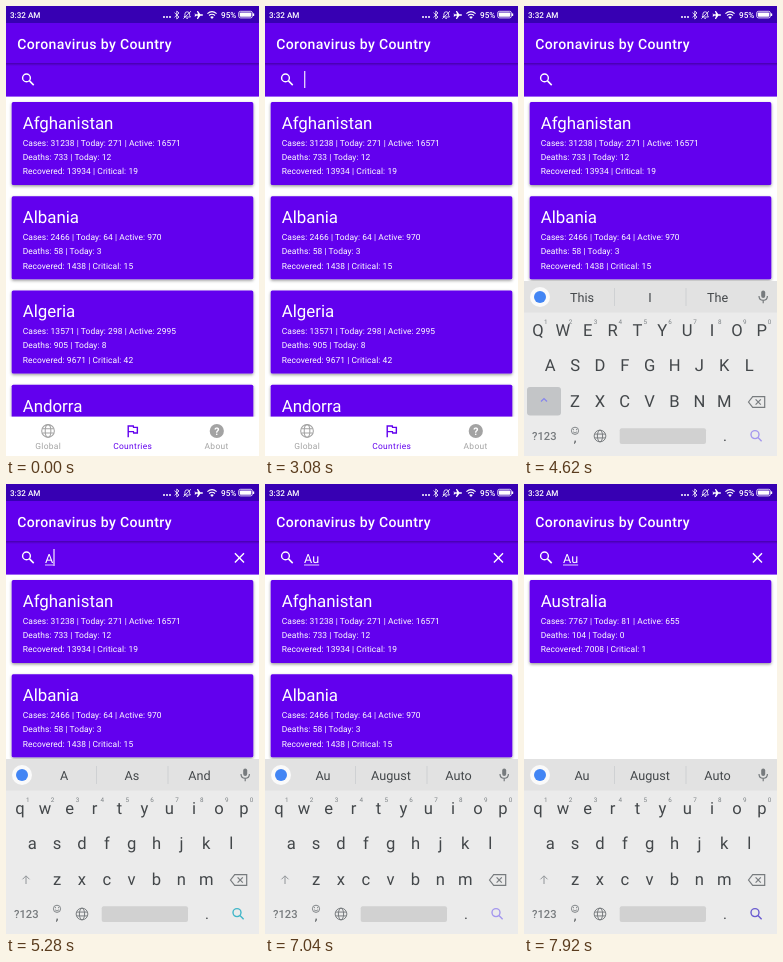
Write an HTML page that moves like this. It is 253x450 px and loops after 8 s.

```html
<!DOCTYPE html>
<html lang="en">
<head>
<meta charset="utf-8">
<title>Country search</title>
<style>
html, body { margin: 0; width: 100%; height: 100%; overflow: hidden; background: #fff; }
svg { display: block; width: 100vw; height: 100vh; }
text { font-family: Roboto, sans-serif; white-space: pre; text-rendering: geometricPrecision; }
.mid { text-anchor: middle; }
.line { fill: none; stroke: currentColor; }
</style>
</head>
<body>
<svg id="stage" viewBox="0 0 253 450">
  <defs>
    <filter id="shadow" x="-5%" y="-10%" width="110%" height="125%">
      <feDropShadow dx="0" dy="1.3" stdDeviation="1.5" flood-opacity=".42"/>
    </filter>
    <linearGradient id="fade" x2="0" y2="1">
      <stop stop-opacity=".28"/><stop offset="1" stop-opacity="0"/>
    </linearGradient>
    <g id="lens">
      <circle class="line" cx="9.5" cy="9.5" r="5.5" stroke-width="2"/>
      <path class="line" d="M13.8 13.8L19.8 19.8" stroke-width="2.2"/>
    </g>
    <g id="globe" class="line" stroke-width="1.5">
      <circle cx="12" cy="12" r="9"/><ellipse cx="12" cy="12" rx="4" ry="9"/>
      <path d="M4 9H20M4 15H20"/>
    </g>
  </defs>

  <rect width="253" height="450" fill="#fff"/>
  <g id="cards"></g>

  <!-- Bars -->
  <rect y="17" width="253" height="73.6" fill="#6200ee"/>
  <rect y="57" width="253" height="3" fill="url(#fade)"/>
  <rect width="253" height="17" fill="#3700b3"/>
  <g fill="#fff" color="#fff">
    <text x="4" y="12" font-size="8.1" font-weight="500">3:32 AM</text>
    <circle cx="158" cy="11" r="1"/><circle cx="161" cy="11" r="1"/><circle cx="164" cy="11" r="1"/>
    <path class="line" d="M168.5 6.7L173 11 170.8 13V5L173 7 168.5 11.3" stroke-width=".8"/>
    <path class="line" d="M178 11H184.5L183.6 9.8V8Q183.4 5.8 181.2 5.8T178.9 8V9.8ZM180.3 12.4H182M185 5.2L177.4 12.6" stroke-width=".8"/>
    <path d="M189 8.3H192L190.9 5H192L194.3 8.3H196.5Q197.6 9 196.5 9.7H194.3L192 13H190.9L192 9.7H190.2L189.4 10.6H188.6L189 9 188.6 7.4H189.4Z"/>
    <path class="line" d="M201.4 7.6Q206 3.6 210.6 7.6M203 9.5Q206 7 209 9.5" stroke-width="1.1"/>
    <path d="M204.2 10.9Q206 9.6 207.8 10.9L206 13Z"/>
    <text x="215" y="12" font-size="8.2" font-weight="500">95%</text>
    <rect class="line" x="232.7" y="5.3" width="13.7" height="6.6" rx="1.8" stroke-width=".8"/>
    <rect x="233.8" y="6.4" width="11.5" height="4.4" rx=".8"/>
    <rect x="247" y="7.2" width="1.2" height="2.8" rx=".5"/>
    <text x="11.2" y="43" font-size="14.06" font-weight="500" letter-spacing=".36">Coronavirus by Country</text>
    <use href="#lens" transform="translate(13.8 65.2) scale(.703)"/>
    <text id="query" x="39" y="79" font-size="12.65"></text>
    <rect id="underline" x="39" y="80.6" height=".8"/>
    <rect id="cursor" y="65" width="1.1" height="17"/>
    <path id="clear" class="line" d="M228.9 69.3L238 78.4M238 69.3L228.9 78.4" stroke-width="1.4"/>
  </g>

  <!-- Bottom navigation -->
  <rect y="410.6" width="253" height="39.4" fill="#fff"/>
  <g class="mid" font-size="8.43" letter-spacing=".33" fill="#a3a3a3" color="#a3a3a3">
    <use href="#globe" transform="translate(33.6 416.5) scale(.703)"/>
    <text x="42.2" y="443">Global</text>
    <g fill="#6200ee" color="#6200ee">
      <path class="line" d="M6 21V5H13.2L13.6 7H19V15H13.8L13.4 13H6" stroke-width="2" transform="translate(118 416.5) scale(.703)"/>
      <text x="126.7" y="443">Countries</text>
    </g>
    <circle cx="210.8" cy="425" r="7.1"/>
    <text x="210.8" y="428.8" font-size="10.5" font-weight="700" letter-spacing="0" style="fill:#fff">?</text>
    <text x="210.6" y="443">About</text>
  </g>

  <!-- Keyboard -->
  <g id="keyboard" fill="#43474a" color="#777b7e">
    <rect y="275" width="253" height="175" fill="#ebebeb"/>
    <rect y="275" width="253" height="31.5" fill="#e2e2e2"/>
    <circle cx="16" cy="291" r="10" fill="#fafafa"/>
    <circle cx="16" cy="291" r="6" fill="#4285f4"/>
    <path class="line" d="M90.5 282V300M162 282V300" stroke-width=".8" style="stroke:#cbcdd0"/>
    <g id="hints" class="mid" font-size="12.65"></g>
    <rect x="237.2" y="284.5" width="4" height="7.6" rx="2" fill="#777b7e"/>
    <path class="line" d="M235 290Q235 294.3 239.2 294.3T243.4 290M239.2 294.3V297.3" stroke-width="1.2"/>
    <rect id="shiftKey" x="3" y="381" width="34" height="28.5" rx="3" fill="#c3c5c7"/>
    <path id="shiftOff" class="line" d="M16.5 395.3L20 391.8 23.5 395.3M20 392V400" stroke-width="1" style="stroke:#909498"/>
    <path id="shiftOn" class="line" d="M17 395.5L20 392.5 23 395.5" stroke-width="1.2" style="stroke:#8685ee"/>
    <g id="keys" class="mid" font-size="16.6"></g>
    <path class="line" d="M224.5 396L228.7 390.7H240.7V401.3H228.7ZM231.6 393.4L236.8 398.6M236.8 393.4L231.6 398.6" stroke-width="1.2"/>
    <text x="8" y="434" font-size="11.2" font-weight="500" fill="#777b7e">?123</text>
    <circle class="line" cx="51" cy="424.8" r="3.6" stroke-width=".9"/>
    <path class="line" d="M49 425.8Q51 428 53 425.8M49.5 423V424.2M52.5 423V424.2" stroke-width=".8"/>
    <text class="mid" x="51" y="436" font-size="13">,</text>
    <use href="#globe" transform="translate(68.2 422.2) scale(.65)"/>
    <rect x="95.7" y="422.3" width="86.3" height="15.7" rx="2" fill="#d1d1d1"/>
    <text class="mid" x="201" y="434.5" font-size="15">.</text>
    <g id="go" class="line" stroke-width="1.4">
      <circle cx="231" cy="428.6" r="4"/><path d="M234 431.6L237.6 435.2"/>
    </g>
  </g>
</svg>
<script>
const $ = id => document.getElementById(id);
const LOOP = 8000, TICK = 220;

const label = (x, y, s, extra = "") => `<text x="${x}" y="${y}" ${extra}>${s}</text>`;

function card([name, cases, today, active, deaths, died, recovered, critical], i) {
  const y = 96.1 + 94.2 * i;
  const lines = [
    `Cases: ${cases} | Today: ${today} | Active: ${active}`,
    `Deaths: ${deaths} | Today: ${died}`,
    `Recovered: ${recovered} | Critical: ${critical}`
  ];
  return `<rect x="5.7" y="${y}" width="241.6" height="83" rx="1.6" fill="#6200ee" filter="url(#shadow)"/>
    <g fill="#fff" font-size="8.43" letter-spacing=".07">
    ${label(16.7, y + 26.9, name, 'font-size="16.87" letter-spacing="0"')}
    ${lines.map((s, n) => label(16.7, y + 43.5 + 14.4 * n, s)).join("")}</g>`;
}

const all = [
  ["Afghanistan", 31238, 271, 16571, 733, 12, 13934, 19],
  ["Albania", 2466, 64, 970, 58, 3, 1438, 15],
  ["Algeria", 13571, 298, 2995, 905, 8, 9671, 42],
  ["Andorra", 855, 0, 11, 52, 0, 792, 3]
];
const found = [["Australia", 7767, 81, 655, 104, 0, 7008, 1]];

function keys(upper) {
  const rows = [["qwertyuiop", 14, 330], ["asdfghjkl", 26.2, 365.2], ["zxcvbnm", 51, 401]];
  return rows.map(([chars, x0, y], row) => [...chars].map((c, i) => {
    const x = x0 + 24.87 * i;
    const digit = row ? "" : label(x + 7.7, 318.3, (i + 1) % 10, 'font-size="6.3" fill="#7b8084"');
    return label(x, y, upper ? c.toUpperCase() : c) + digit;
  }).join("")).join("");
}

// Each step keeps the values of the steps before it.
const steps = [
  { at: 0, query: "", list: all },
  { at: 3020, blink: 3020 },
  { at: 3520, keyboard: true, words: ["this", "I", "the"], go: "#5b6bd0" },
  { at: 4620, shift: true, words: ["This", "I", "The"], go: "#a497ee" },
  { at: 5060, shift: false, query: "A", blink: 5060, words: ["A", "As", "And"], go: "#41b6c8" },
  { at: 6160, query: "Au", blink: 6160, words: ["Au", "August", "Auto"], go: "#a497ee" },
  { at: 7480, list: found, go: "#6a5bd0" }
];

const show = (id, on) => $(id).style.display = on ? "" : "none";
let shown = -1;

function apply(s) {
  $("cards").innerHTML = s.list.map(card).join("");
  show("keyboard", s.keyboard);
  $("hints").innerHTML = (s.words || []).map((w, i) => label([58, 126, 193.5][i], 295.6, w)).join("");
  $("keys").innerHTML = keys(s.shift);
  show("shiftKey", s.shift);
  show("shiftOn", s.shift);
  show("shiftOff", !s.shift);
  $("go").style.color = s.go || "";
  $("query").textContent = s.query;
  show("clear", s.query);
  const width = s.query ? $("query").getComputedTextLength() : 0;
  $("underline").setAttribute("width", width);
  $("cursor").setAttribute("x", 39.2 + width);
}

function draw() {
  const t = Math.floor(performance.now() % LOOP / TICK) * TICK;
  const past = steps.filter(s => s.at <= t);
  const state = Object.assign({}, ...past);
  if (past.length !== shown) {
    shown = past.length;
    apply(state);
  }
  show("cursor", state.blink && (t - state.blink) % 1000 < 500);
  requestAnimationFrame(draw);
}
draw();
</script>
</body>
</html>
```
